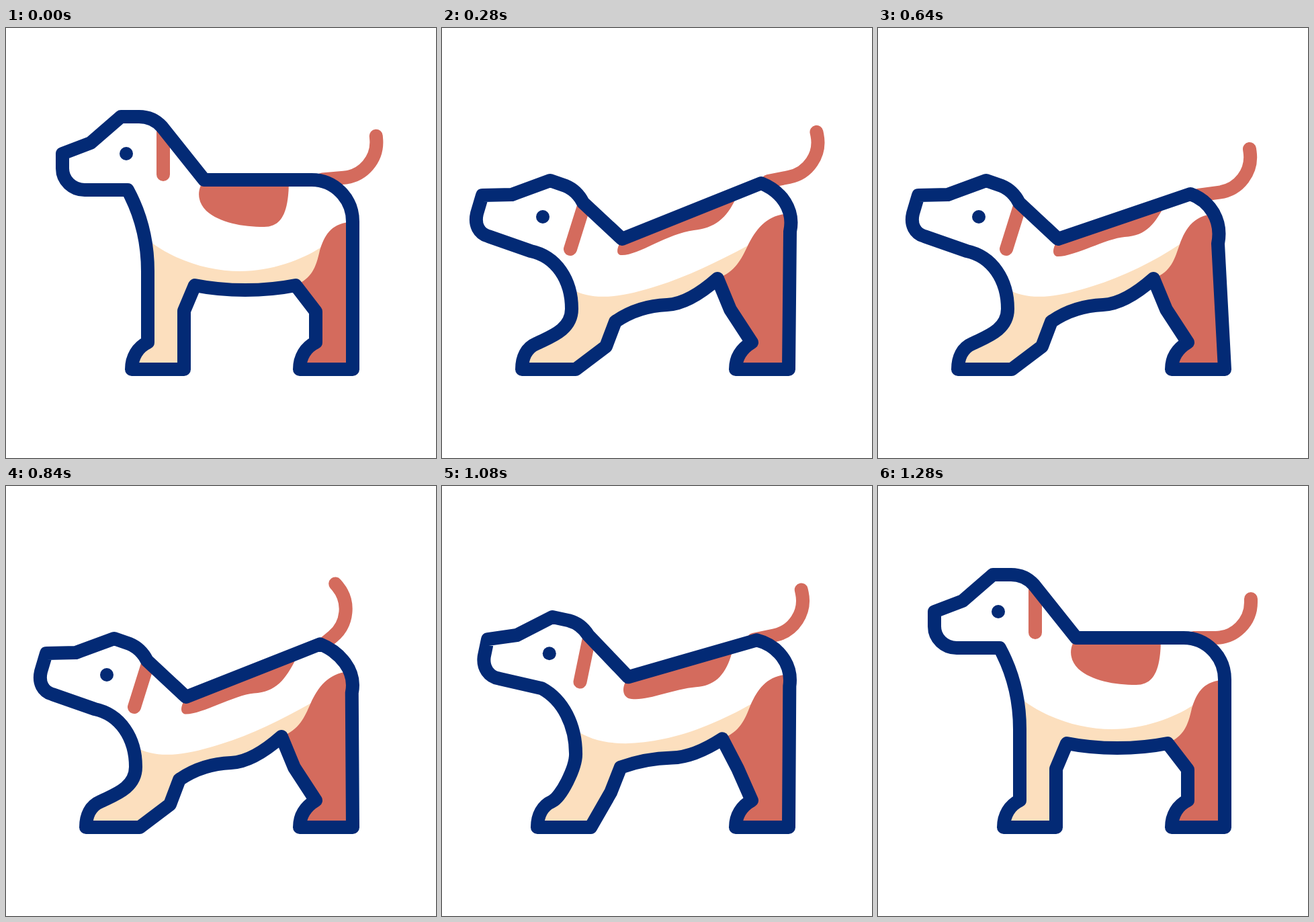
These frames come from a looping animation (640x640 px, 2000 ms). An HTML page:

```html
<!DOCTYPE html>
<html lang="en">
<head>
<meta charset="utf-8">
<title>Stretching dog</title>
<style>
  html, body { margin: 0; width: 100%; height: 100%; overflow: hidden; background: #fff; }
  svg { display: block; width: 100%; height: 100%; }
  .line { fill: none; stroke-width: 20; stroke-linecap: round; stroke-linejoin: round; }
  .navy { stroke: #032a75; }
  .rust { stroke: #d46b5d; }
</style>
</head>
<body>
<svg viewBox="0 0 640 640">
  <clipPath id="inside"><path data-part="body"/></clipPath>
  <path id="tail" class="line rust" d="M15 0 H47 A53 53 0 0 0 100 -53 V-58"/>
  <path data-part="body" fill="#fff"/>
  <g clip-path="url(#inside)">
    <path data-part="belly" fill="#fcdfbe"/>
    <path data-part="thigh" fill="#d46b5d"/>
    <path data-part="spot" fill="#d46b5d"/>
    <path data-part="ear" class="line rust"/>
  </g>
  <path data-part="body" class="line navy"/>
  <circle id="eye" r="10" fill="#032a75"/>
</svg>
<script>
const LOOP = 2000, STEP = 40;

// Each part: standing path, and bowing path as a function of
// the rump's dip d (down) and lean k (forward).
const parts = {
  body: [
    `M84 187 L126 171 L171 132 L198 132 C211 132 223 137 232 147 L295 226
     L455 226 C489 226 516 254 516 288 L516 508 L437 508 C437 490 446 475 461 468
     L461 422 L431 383 C406 388 381 390 356 390 C331 390 306 388 281 383
     L265 421 L265 508 L187 508 C187 490 196 475 211 468
     C211 468 211 362 211 362 C211 318 200 276 181 241 L117 241 C99 241 84 227 84 209 Z`,
    (d, k) => `M60 249 L104 248 L161 227 L184 235 C196 240 204 248 210 260 L268 314
     L${475 - 10 * k} ${231 + 16 * d}
     C${505 - 12 * k} ${243 + 14 * d} ${525 - 12 * d} ${270 + 15 * d} ${518 - 12 * d} ${303 + 18 * d}
     L516 508 L437 508 C437 490 446 477 461 468
     L429 419 L410 373 C385 395 360 411 335 412 C305 413 280 422 258 437
     L244 474 L199 508 L119 508 C119 490 126 476 140 470
     C160 460 193 450 193 418 C193 375 170 340 132 332 L69 310 C55 306 48 293 52 276 Z`
  ],
  belly: [
    `M205 310 C245 345 300 362 348 362 C395 362 440 345 468 327 L450 420 L270 520 L170 520 Z`,
    d => `M192 388 C225 408 270 400 320 384 C365 370 410 348 ${455 - 6 * d} ${324 - 2 * d}
     L430 420 L200 520 L100 520 Z`
  ],
  thigh: [
    `M516 289 C485 289 474 308 467 331 C461 358 455 372 431 383
     L461 422 L461 468 L437 508 L516 508 Z`,
    d => `M${520 - 10 * d} 276 C${485 - 15 * d} 276 ${468 - 10 * d} 298 ${455 - 6 * d} ${324 - 2 * d}
     C${445 - 4 * d} 345 437 362 410 373 L429 419 L461 468 L437 508 L516 508 Z`
  ],
  spot: [
    `M295 226 C284 240 284 258 298 272 C318 290 352 296 384 296 C410 296 421 275 421 226 Z`,
    (d, k) => `M268 314 C262 324 257 336 266 ${338 + 2 * k}
     C${290 - 2 * k} ${340 + 2 * k} ${335 + 5 * k} ${306 + 7 * k} ${375 - 8 * k} ${301 + 10 * k}
     C${408 - 8 * k} ${298 + 11 * k} ${427 - 15 * k} ${280 + 12 * k} ${440 - 10 * k} ${247 + 11 * k} Z`
  ],
  ear: [`M234 150 L234 218`, () => `M212 262 L191 329`]
};

// Rows of time and values.
const bowKeys = [[36, 0], [236, 1], [1002, 1], [1202, 0]];
const rumpKeys = [[320, 0, 0], [640, 1, 1], [840, 0.27, 0.75], [1000, 0, 0]]; // time, dip, lean
const tailKeys = [ // time, angle, base x, base y
  [-35, 0, 455, 226], [130, -40, 464, 231], [360, 0, 472, 231], [520, -40, 468, 244],
  [670, -4, 460, 252], [850, -40, 450, 254], [1080, -12, 449, 232], [1280, 0, 455, 226]
];

// Smooth interpolation that comes to rest at every turning point.
function track(keys, t, col = 1) {
  const last = keys.length - 1;
  if (t <= keys[0][0]) return keys[0][col];
  if (t >= keys[last][0]) return keys[last][col];
  const slope = i => {
    if (i === 0 || i === last) return 0;
    const a = keys[i - 1], b = keys[i], c = keys[i + 1];
    const turns = (b[col] - a[col]) * (c[col] - b[col]) <= 0;
    return turns ? 0 : (c[col] - a[col]) / (c[0] - a[0]);
  };
  const i = keys.findIndex(k => k[0] > t) - 1;
  const [a, b] = [keys[i], keys[i + 1]];
  const span = b[0] - a[0], s = (t - a[0]) / span, r = 1 - s;
  return a[col] * r * r * (1 + 2 * s) + b[col] * s * s * (3 - 2 * s)
    + span * s * r * (r * slope(i) - s * slope(i + 1));
}

const mix = (a, b, p) => a + (b - a) * p;

function mixPath(from, to, p) {
  const number = /-?[\d.]+/g, ends = to.match(number);
  let i = 0;
  return from.replace(number, n => mix(+n, +ends[i++], p).toFixed(2));
}

const tail = document.getElementById('tail');
const eye = document.getElementById('eye');
const shapes = document.querySelectorAll('[data-part]');

function draw(t) {
  const bow = track(bowKeys, t);
  const dip = track(rumpKeys, t, 1), lean = track(rumpKeys, t, 2);
  for (const el of shapes) {
    const [stand, bowed] = parts[el.dataset.part];
    el.setAttribute('d', mixPath(stand, bowed(dip, lean), bow));
  }
  eye.setAttribute('cx', mix(179, 150, bow));
  eye.setAttribute('cy', mix(187, 281, bow));
  const [angle, x, y] = [1, 2, 3].map(col => track(tailKeys, t, col));
  tail.setAttribute('transform', `translate(${x} ${y}) rotate(${angle})`);
}

const start = performance.now();
function tick() {
  const t = (performance.now() - start) % LOOP;
  draw(Math.floor(t / STEP) * STEP);
  requestAnimationFrame(tick);
}
tick();
</script>
</body>
</html>
```
